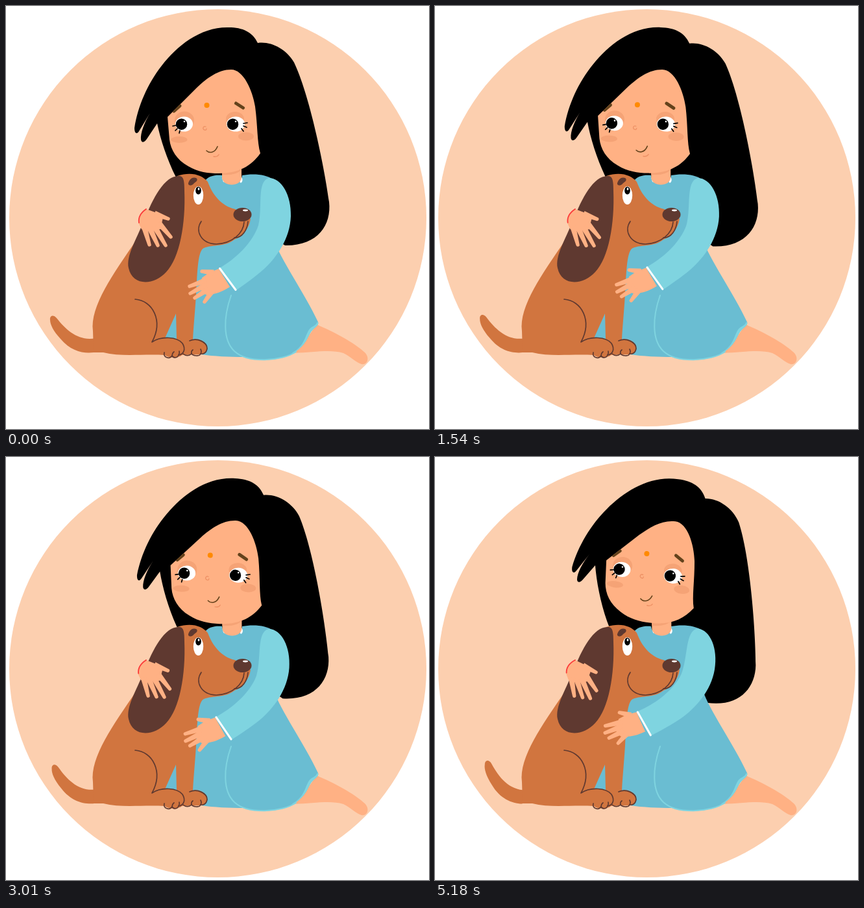
An HTML page with a canvas for the animation above (5.25 s loop, 652x652 px).

```html
<!DOCTYPE html>
<html lang="en">
<head>
<meta charset="utf-8">
<title>Girl hugging a dog</title>
<style>
html, body { margin: 0; width: 100%; height: 100%; overflow: hidden; background: #fff; }
canvas { display: block; width: 652px; height: 652px; }
</style>
</head>
<body>
<canvas id="stage" width="652" height="652"></canvas>
<script>
const ctx = document.getElementById('stage').getContext('2d');
const STEP = 70, LOOP = 5250, SWING = 20;

const C = {
  peach: '#fccfaf', skin: '#ffb184', blush: '#f5a376', dress: '#6abdd2', sleeve: '#7fd4e0',
  fur: '#d1753f', ear: '#5f3930', brow: '#63421b', bindi: '#ff8a00',
  red: '#fb3a3a', black: '#000', white: '#fff'
};

const P = {
  hair: 'M388 57C380 40 365 33 343 33C300 32 264 61 240 92C218 120 203 155 198 188C198 197 202 198 205 193' +
    'L222 165C213 180 207 196 208 206C209 211 213 211 217 205L233 181C238 205 248 236 262 264L276 290L320 300L400 350L430 369' +
    'C480 370 502 338 498 302C490 243 467 135 444 87C432 66 408 54 388 57Z',
  face: 'M347 98C327 98 310 111 294 126L266 154L249 171L252 206C254 222 263 237 281 247C296 256 312 258 328 258' +
    'C358 258 378 247 392 227C387 210 388 185 384 155C380 130 366 98 347 98Z',
  neck: 'M333 244V265C335 279 361 279 363 265V244Z',
  neckShade: 'M333 244H363V252Q355 262 333 260Z',
  dress: 'M306 270C312 262 322 260 333 261C335 279 362 279 364 261C380 258 402 259 412 268' +
    'L425 300L413 360C422 389 460 442 481 487C483 492 476 495 471 501C465 509 463 523 444 534C425 546 395 549 366 541' +
    'C345 541 320 540 300 537L240 515L295 380Z',
  hem: 'M347 446C335 480 334 515 352 532C372 551 425 548 447 533',
  hemEdge: 'M481 487C483 492 476 495 471 501C465 509 463 523 444 534L440 536L442 534C460 524 461 508 467 499C471 493 478 493 479 488Z',
  leg: 'M479 491C505 502 537 519 553 534C562 543 556 554 548 552C539 549 532 541 520 535C500 529 475 534 443 535L462 515Z',
  sleeve: 'M405 265C425 265 440 292 439 324C438 358 417 388 397 406C382 419 368 429 355 438L329 404' +
    'C352 391 380 366 389 338C396 310 386 271 405 265Z',
  palm: 'M328 405L313 411L302 419L300 437L308 445C322 445 332 441 345 433Z',
  wristHand: 'M216 313L230 318L242 326L238 344L219 347L209 344L204 334Q204 322 216 313Z',
  tail: 'M135 534C119 536 100 532 84 513C73 501 68 491 68 484C67 477 73 475 78 481C93 500 112 517 138 512L146 520Z',
  dog: 'M264 262C285 255 302 260 311 271C318 290 331 308 353 313L377 328C375 342 365 355 352 360C337 372 320 367 305 373' +
    'C296 377 295 405 293 445C291 475 289 495 288 514C300 511 311 520 310 528C309 537 298 538 288 537L271 538' +
    'C266 543 250 543 245 538C210 536 178 541 150 534L135 534L134 501C129 463 166 412 200 362Z',
  gap: 'M262 474L245 512Q254 511 263 513Z',
  ear: 'M268 262C245 260 227 295 213 330C200 362 185 385 189 404C195 432 228 431 247 410C268 388 277 335 275 285C275 270 274 263 268 262Z',
  dogBrow: 'M281 273C283 266 288 263 293 265C297 268 293 271 290 273C287 278 280 277 281 273Z',
  mouth: 'M301 332C291 346 300 366 324 367C348 366 366 351 367 333',
  jaw: 'M373 332C372 345 364 358 352 357',
  thigh: 'M199 452C226 454 243 485 225 518C240 508 264 510 272 520C278 530 273 537 266 538C264 543 258 543 256 539C252 545 242 542 244 534',
  toes: 'M256 540Q256 535 259 533M266 538Q268 535 267 532',
  paw: 'M283 516C295 511 310 518 310 528C309 535 304 537 300 536C298 541 288 539 286 536C282 540 276 539 273 536',
  pawToes: 'M286 536Q285 532 288 530M300 536Q302 533 300 529'
};
for (const k in P) P[k] = new Path2D(P[k]);

function fill(path, color) {
  ctx.fillStyle = color;
  ctx.fill(path);
}

function line(path, color, width) {
  ctx.strokeStyle = color;
  ctx.lineWidth = width;
  ctx.stroke(typeof path === 'string' ? new Path2D(path) : path);
}

function oval(x, y, rx, ry, color) {
  ctx.fillStyle = color;
  ctx.beginPath();
  ctx.ellipse(x, y, rx, ry, 0, 0, Math.PI * 2);
  ctx.fill();
}

// Tapered finger from its root to the centre of its rounded tip.
function finger(x, y, tipX, tipY) {
  const a = Math.atan2(tipY - y, tipX - x);
  const nx = -Math.sin(a), ny = Math.cos(a);
  ctx.fillStyle = C.skin;
  ctx.beginPath();
  ctx.moveTo(x - nx * 4.5, y - ny * 4.5);
  ctx.arc(tipX, tipY, 2.7, a - Math.PI / 2, a + Math.PI / 2);
  ctx.lineTo(x + nx * 4.5, y + ny * 4.5);
  ctx.fill();
}

// Draws a part turned by deg around a joint.
function turned(x, y, deg, draw) {
  ctx.save();
  ctx.translate(x, y);
  ctx.rotate(deg * Math.PI / 180);
  ctx.translate(-x, -y);
  draw();
  ctx.restore();
}

function face() {
  fill(P.face, C.skin);
  ctx.save();
  ctx.clip(P.face);
  line('M259 162L268 154', C.brow, 5);
  oval(275, 176, 15, 13.5, C.blush);
  oval(353, 174, 14, 11, C.blush);
  ctx.restore();
  line('M354.5 150L365.5 157', C.brow, 5);
  oval(267, 206, 12.5, 5, C.blush);
  oval(370, 201, 12, 6.5, C.blush);
  oval(274.5, 182, 13.5, 11.5, C.white);
  oval(354, 182, 14, 11.5, C.white);
  for (const x of [270.5, 349.5]) {
    oval(x, 182.2, 8.7, 8.7, C.black);
    oval(x + 4.5, 178, 1.3, 1.3, C.white);
  }
  line('M257 185L262 184M261 192L264 189M267 196L268 192M366 181L372 180M366 185L371 187M363 189L366 193', C.black, 1.7);
  line('M308 186C304 184 302 190 306 191Q309 192 309 189', '#ed9064', 1.3);
  line('M309 223C313 227 322 227 326 216.5', C.brow, 1.6);
  line('M320 232Q326 233 328 229', '#ed9064', 1.4);
  oval(309.5, 153, 4, 4, C.bindi);
}

function dog(p) {
  turned(131, 530, 15 * p, () => fill(P.tail, C.fur));
  fill(P.dog, C.fur);
  fill(P.gap, C.dress);
  fill(P.ear, C.ear);
  fill(P.dogBrow, C.ear);
  oval(296.5, 292, 7.7, 14, C.white);
  oval(296.5, 284.5, 4.3, 6, C.black);
  oval(297, 282, 1.4, 2, C.white);
  for (const k of ['mouth', 'jaw', 'thigh', 'toes', 'paw', 'pawToes']) line(P[k], C.ear, 1.7);
  oval(364.5, 321.5, 14, 10.5, C.ear);
  oval(369, 315, 4, 1.4, C.white);
}

function draw(p) {
  ctx.fillStyle = C.white;
  ctx.fillRect(0, 0, 652, 652);
  ctx.lineCap = ctx.lineJoin = 'round';
  oval(326.5, 326.5, 321.5, 321.5, C.peach);

  const head = part => turned(348.5, 283, 11.2 * p, part);
  head(() => fill(P.hair, C.black));
  fill(P.leg, C.skin);
  fill(P.dress, C.dress);
  fill(P.hemEdge, C.sleeve);
  line(P.hem, C.sleeve, 2);

  ctx.save();
  ctx.translate(2 * p, 0);
  line('M335 266L336 270M362 265Q364 268 362 271', C.white, 3);
  fill(P.neck, C.skin);
  fill(P.neckShade, C.blush);
  ctx.restore();
  head(face);

  dog(p);

  turned(216, 313, 10 * p, () => {
    fill(P.wristHand, C.skin);
    finger(229, 320, 250, 328);
    finger(213, 340, 221, 368);
    finger(221, 341, 234, 369);
    finger(229, 340, 246, 369);
    finger(235, 334, 254, 356);
    line('M216 313Q203 322 205 334', C.red, 1.8);
  });

  turned(411, 264, 11.2 * p, () => {
    fill(P.palm, C.skin);
    finger(320, 411, 302, 409);
    finger(308, 423, 283, 432);
    finger(308, 430, 284, 443);
    finger(312, 436, 291, 450);
    finger(318, 439, 306, 456);
    fill(P.sleeve, C.sleeve);
    line('M329.5 404.5L354 437.5', C.white, 3);
  });
}

function tick(now) {
  const i = Math.floor(now % LOOP / STEP);
  draw((1 - Math.cos(2 * Math.PI * i / SWING)) / 2);
  requestAnimationFrame(tick);
}

draw(0);
requestAnimationFrame(tick);
</script>
</body>
</html>
```
